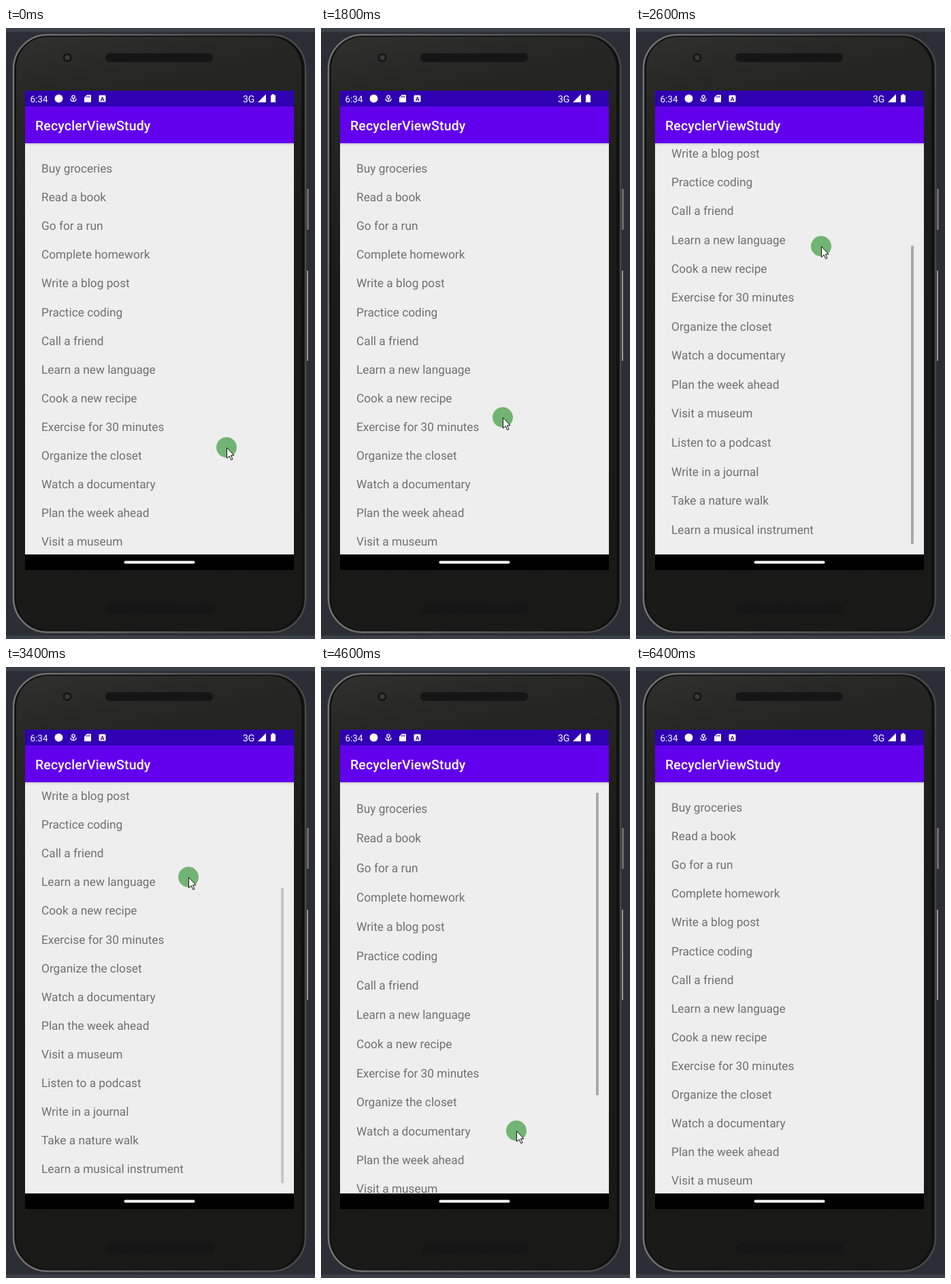
An HTML page that plays this animation: 454 by 896 pixels, repeating every 6800 ms.

```html
<!DOCTYPE html>
<html lang="en">
<head>
<meta charset="utf-8">
<title>Scrolling list</title>
<style>
  html, body { margin: 0; width: 100%; height: 100%; overflow: hidden; background: #2b2e34; }
  svg { display: block; width: 100%; height: 100%; }
  text { font-family: Roboto, sans-serif; text-rendering: geometricPrecision; }
  #rows { font-size: 17.28px; fill: #707070; }
</style>
</head>
<body>
<svg viewBox="0 0 454 896">
  <defs>
    <linearGradient id="body" x1="0" y1="0" x2=".12" y2="1">
      <stop offset="0" stop-color="#30302f"/>
      <stop offset=".1" stop-color="#272826"/>
      <stop offset=".4" stop-color="#1b1c1a"/>
      <stop offset="1" stop-color="#191a18"/>
    </linearGradient>
    <linearGradient id="rim" x1="0" y1="0" x2="1" y2="0">
      <stop offset="0" stop-color="#747474"/>
      <stop offset=".5" stop-color="#5c5c5c"/>
      <stop offset="1" stop-color="#484848"/>
    </linearGradient>
    <linearGradient id="shade" x1="0" y1="0" x2="0" y2="1">
      <stop offset="0" stop-opacity=".14"/>
      <stop offset="1" stop-opacity="0"/>
    </linearGradient>
    <pattern id="mesh" width="4" height="4" patternUnits="userSpaceOnUse">
      <rect width="4" height="4" fill="#0e0f0e"/>
      <circle cx="1" cy="1" r=".8" fill="#2a2b2a"/>
      <circle cx="3" cy="3" r=".8" fill="#2a2b2a"/>
    </pattern>
    <clipPath id="content"><rect x="28" y="169" width="395" height="603"/></clipPath>
  </defs>

  <!-- Desktop and phone shell -->
  <rect width="454" height="896" fill="#2b2e34"/>
  <path d="M0 0H454V6H0ZM0 891H454V896H0Z" fill="#3b3f47"/>
  <path d="M442 236h3v60h-3Z" fill="#6c6c6c"/>
  <path d="M442 356h2v132h-2Z" fill="#989898"/>
  <rect x="11" y="10" width="429" height="876" rx="50" fill="#101110" stroke="url(#rim)" stroke-width="2.5"/>
  <rect x="15" y="13" width="419" height="870" rx="46" fill="url(#body)"/>
  <circle cx="90" cy="43.500" r="7.500" fill="#171817" stroke="#333" stroke-width="1"/>
  <circle cx="90" cy="43.500" r="3.500" fill="#3b3c3b"/>
  <rect x="146" y="37" width="158" height="13" rx="6" fill="url(#mesh)"/>
  <rect x="147" y="846" width="158" height="13" rx="6" fill="url(#mesh)"/>

  <!-- Screen -->
  <rect x="28" y="92" width="395" height="703" fill="#eee"/>
  <rect x="28" y="169" width="395" height="4" fill="url(#shade)"/>
  <g clip-path="url(#content)">
    <g id="rows"></g>
    <rect id="bar" x="404" width="4" fill="#a9a9a9"/>
  </g>
  <rect x="28" y="92" width="395" height="23" fill="#3000b3"/>
  <rect x="28" y="115" width="395" height="54" fill="#6200ee"/>
  <rect x="28" y="772" width="395" height="23"/>
  <rect x="173.500" y="781.500" width="104" height="4" rx="2" fill="#fff"/>
  <text x="43" y="149.500" font-size="19.5" font-weight="500" letter-spacing=".15" fill="#fff">RecyclerViewStudy</text>

  <!-- Status icons -->
  <g fill="#fff">
    <text x="35.500" y="109" font-size="13.5">6:34</text>
    <text x="348" y="108.500" font-size="14">3G</text>
    <circle cx="77.500" cy="103.500" r="6"/>
    <circle cx="99" cy="101" r="2.200" fill="none" stroke="#fff" stroke-width="1.300"/>
    <path d="M95 103.500q0 4 4 4t4-4M99 103v5" fill="none" stroke="#fff" stroke-width="1.300"/>
    <path d="M119 98h5q1 0 1 1v9q0 1-1 1h-8q-1 0-1-1v-6Z"/>
    <path d="M118.500 100v2M120.500 99.500v2.500M122.500 99.500v2.500" stroke="#3000b3"/>
    <rect x="136.500" y="98.500" width="10" height="10" rx="1.500"/>
    <text x="141.500" y="106.700" font-size="8.500" font-weight="700" text-anchor="middle" style="fill:#3000b3">A</text>
    <path d="M370 109L382 97V109Z"/>
    <path d="M391 97h3v1.500h2v10.500h-7V98.500h2Z"/>
  </g>

  <g id="pointer">
    <circle r="15" fill="#72b473"/>
    <path d="M.5.5V16L4.200 12.700 6.700 18.500 9 17.500 6.500 11.800H11Z" fill="#fff" stroke="#111" stroke-linejoin="round"/>
  </g>
</svg>
<script>
const LOOP = 6800, STEP = 200;
const TOP = 169, BOTTOM = 772, VIEW = BOTTOM - TOP;
const ROW_PITCH = 42.115, FIRST_BASELINE = 212;
const MAX_SCROLL = 185.5, BAR_TOP = 184, BAR_LENGTH = 433, BAR_TRAVEL = 140;

const tasks = [
  'Buy groceries', 'Read a book', 'Go for a run', 'Complete homework', 'Write a blog post',
  'Practice coding', 'Call a friend', 'Learn a new language', 'Cook a new recipe',
  'Exercise for 30 minutes', 'Organize the closet', 'Watch a documentary',
  'Plan the week ahead', 'Visit a museum', 'Listen to a podcast', 'Write in a journal',
  'Take a nature walk', 'Learn a musical instrument'
];

// Each key is a time followed by its values.
const pointerKeys = [
  [0, 324, 615], [600, 282, 583], [1000, 282, 583], [1600, 267, 571], [1800, 267, 571],
  [2000, 257, 500], [2200, 257, 430], [2600, 272, 320], [2800, 282, 262], [3000, 282, 266],
  [3400, 268, 308], [3800, 268, 305], [4000, 270, 350], [4600, 287, 680], [4800, 288, 678],
  [5200, 290, 465], [5400, 289, 460], [5800, 243, 651], [6200, 73, 885]
];
const scrollKeys = [
  [1800, 0], [2000, 50], [2200, 133], [2400, 182], [2600, MAX_SCROLL],
  [3800, MAX_SCROLL], [4000, 150], [4200, 45], [4400, 0]
];
// Positive pulls the list down from the top edge, negative up from the bottom.
const stretchKeys = [
  [2400, 0], [2600, -5], [2800, -8], [3000, -3], [3400, 0], [4200, 0],
  [4400, 5.5], [4600, 11.6], [4800, 9], [5000, 3.5], [5200, 1], [5400, 0]
];
const barKeys = [
  [1800, 0], [2000, 1], [3200, 1], [3400, .6], [3600, 0],
  [3800, 0], [4000, 1], [5000, 1], [5200, .85], [5400, .1], [5600, 0]
];

function sample(keys, time) {
  const next = keys.findIndex(key => key[0] > time);
  if (next < 0) return keys.at(-1).slice(1);
  if (next === 0) return keys[0].slice(1);
  const from = keys[next - 1], to = keys[next];
  const mix = (time - from[0]) / (to[0] - from[0]);
  return from.slice(1).map((value, i) => value + (to[i + 1] - value) * mix);
}

function warp(y, stretch) {
  const depth = (stretch > 0 ? y - TOP : BOTTOM - y) / VIEW;
  return y + stretch * (1 - (1 - depth) ** 2);
}

const find = id => document.getElementById(id);
const bar = find('bar'), pointer = find('pointer');
const rows = tasks.map(task => {
  const row = document.createElementNS('http://www.w3.org/2000/svg', 'text');
  row.textContent = task;
  return find('rows').appendChild(row);
});

function draw(time) {
  const [x, y] = sample(pointerKeys, time);
  const [scroll] = sample(scrollKeys, time);
  const [stretch] = sample(stretchKeys, time);
  const [barOpacity] = sample(barKeys, time);

  rows.forEach((row, i) => {
    const baseline = FIRST_BASELINE + i * ROW_PITCH - scroll;
    const shown = warp(baseline, stretch);
    const scale = (shown - warp(baseline - 12, stretch)) / 12;
    row.setAttribute('transform', `translate(52 ${shown}) scale(1 ${scale})`);
  });

  const barTop = BAR_TOP + scroll / MAX_SCROLL * BAR_TRAVEL;
  const barStart = warp(barTop, stretch);
  bar.setAttribute('y', barStart);
  bar.setAttribute('height', warp(barTop + BAR_LENGTH, stretch) - barStart);
  bar.setAttribute('opacity', barOpacity);

  pointer.setAttribute('transform', `translate(${x} ${y})`);
  pointer.setAttribute('visibility', time < 6400 ? 'visible' : 'hidden');
}

const start = performance.now();
function tick() {
  const time = (performance.now() - start) % LOOP;
  draw(Math.floor(time / STEP) * STEP);
  requestAnimationFrame(tick);
}
tick();
</script>
</body>
</html>
```
